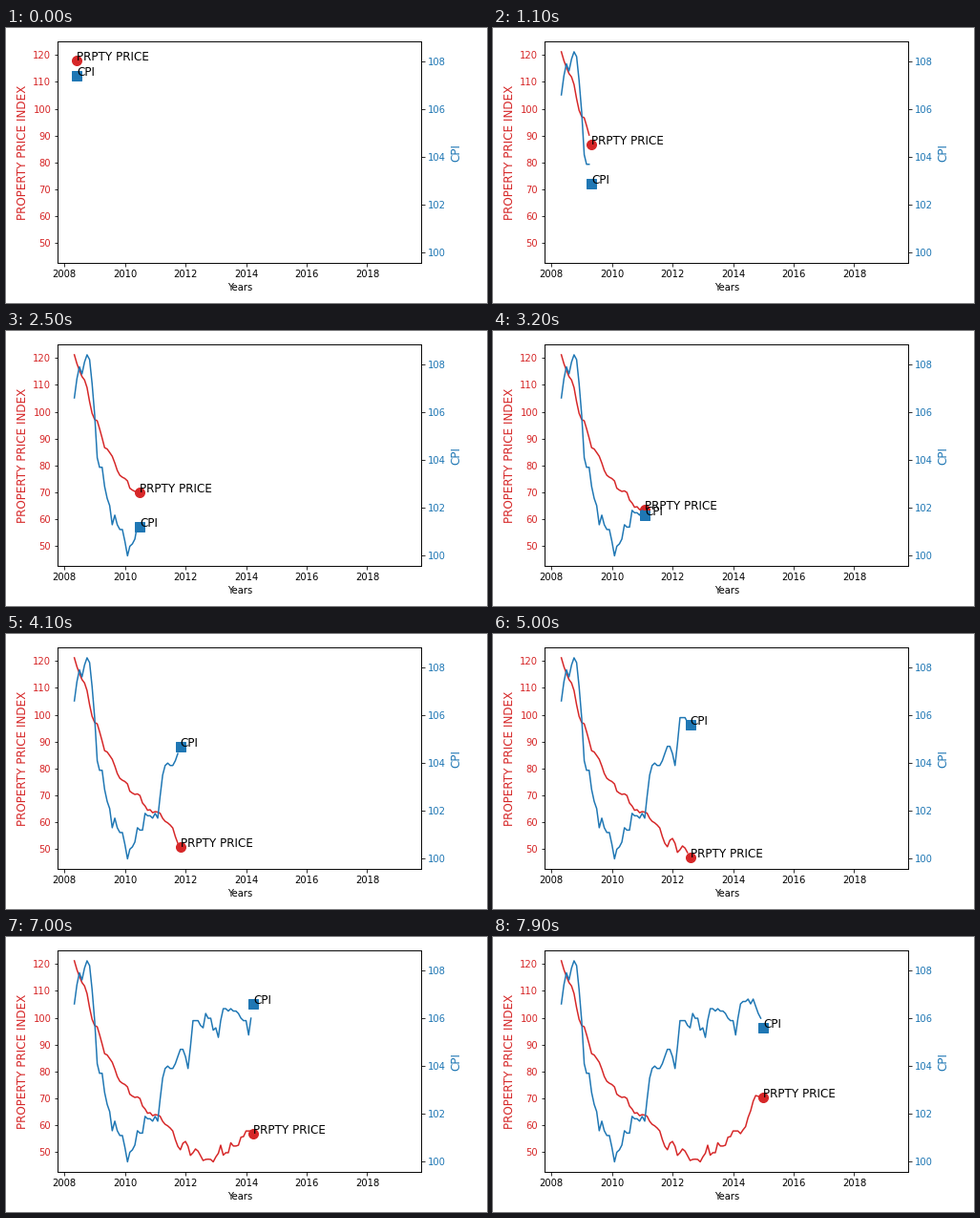
A matplotlib script that plays this animation: 504 by 288 pixels, repeating every 8000 ms.

```python
import numpy as np
import matplotlib.pyplot as plt
import matplotlib.dates as mdates
from matplotlib.animation import FuncAnimation

W, H, DPI = 504, 288, 72
FRAMES, INTERVAL = 80, 100
RED, BLUE = "tab:red", "tab:blue"

price = np.array([
    121.2, 117.9, 115.4, 113.1, 111.8, 109, 103.7, 99.4, 97.1, 96.6, 93.7, 90.2,
    86.6, 86.1, 84.8, 83.4, 80.9, 78.1, 76.3, 75.6, 75.1, 74.2, 71.5, 70.8,
    70.3, 70.5, 69.9, 67.1, 66, 64.4, 64.6, 63.5, 63.9, 63.7, 63.3, 61.4,
    60.3, 59.7, 58.9, 57.8, 54.6, 52.1, 50.8, 53.2, 53.9, 52.1, 48.7, 49.7,
    51.1, 50.3, 48.6, 46.8, 47.2, 47.3, 47.2, 46.3, 48.1, 49.5, 52.5, 48.8,
    49.7, 49.7, 53.4, 52.2, 52.2, 52.5, 55.5, 55.7, 57.8, 57.8, 57.8, 56.8,
    58.2, 59.4, 62.8, 65.3, 68.9, 71, 70.7, 70.4, 70.3])

# tenths of a point above 100
cpi = 100 + 0.1 * np.array([
    66, 74, 79, 76, 81, 84, 82, 72, 59, 41, 37, 37, 29, 24, 21, 13, 17, 13,
    11, 11, 6, 0, 4, 5, 7, 13, 12, 12, 19, 18, 18, 17, 19, 17, 26, 35,
    39, 40, 39, 39, 41, 44, 47, 47, 44, 39, 48, 59, 59, 59, 57, 56, 62, 60,
    60, 55, 56, 52, 59, 64, 64, 63, 64, 63, 63, 62, 60, 59, 59, 53, 60, 66,
    67, 67, 68, 66, 68, 65, 62, 60, 56])

months = mdates.date2num(np.arange("2008-05", "2019-05", dtype="datetime64[M]"))


def padded(lo, hi):
    pad = 0.05 * (hi - lo)
    return lo - pad, hi + pad


def style(ax, label, color, limits):
    ax.set_ylabel(label, color=color, fontsize=12)
    ax.tick_params(axis="y", labelcolor=color)
    ax.set_ylim(*padded(*limits))


def make_series(ax, values, color, marker, name):
    line, = ax.plot([], [], color=color, lw=1.5)
    head, = ax.plot([], [], marker, color=color, ms=10)
    tag = ax.text(months[0], values[0], name, fontsize=12)
    return values, line, head, tag


plt.rcParams["font.family"] = "DejaVu Sans"
fig = plt.figure(figsize=(W / DPI, H / DPI), dpi=DPI, facecolor="white")
left, right, top, bottom = 54.3, 435.3, 14.4, 246
ax = fig.add_axes([left / W, 1 - bottom / H, (right - left) / W, (bottom - top) / H])
ax2 = ax.twinx()

style(ax, "PROPERTY PRICE INDEX", RED, (46.3, 121.2))
style(ax2, "CPI", BLUE, (100, 108.4))
ax.set_xlabel("Years")
ax.set_xlim(*padded(months[0], months[-1]))
ax.xaxis.set_major_locator(mdates.YearLocator(2))
ax.xaxis.set_major_formatter(mdates.DateFormatter("%Y"))

series = [make_series(ax, price, RED, "o", "PRPTY PRICE"),
          make_series(ax2, cpi, BLUE, "s", "CPI")]


def update(i):
    # the marker leads the line by one month
    n = i + 1
    artists = []
    for values, line, head, tag in series:
        line.set_data(months[:n], values[:n])
        head.set_data([months[n]], [values[n]])
        tag.set_position((months[n], values[n]))
        artists += [line, head, tag]
    return artists


anim = FuncAnimation(fig, update, frames=FRAMES, interval=INTERVAL,
                     repeat=True, repeat_delay=0, blit=False)
plt.show()
```
